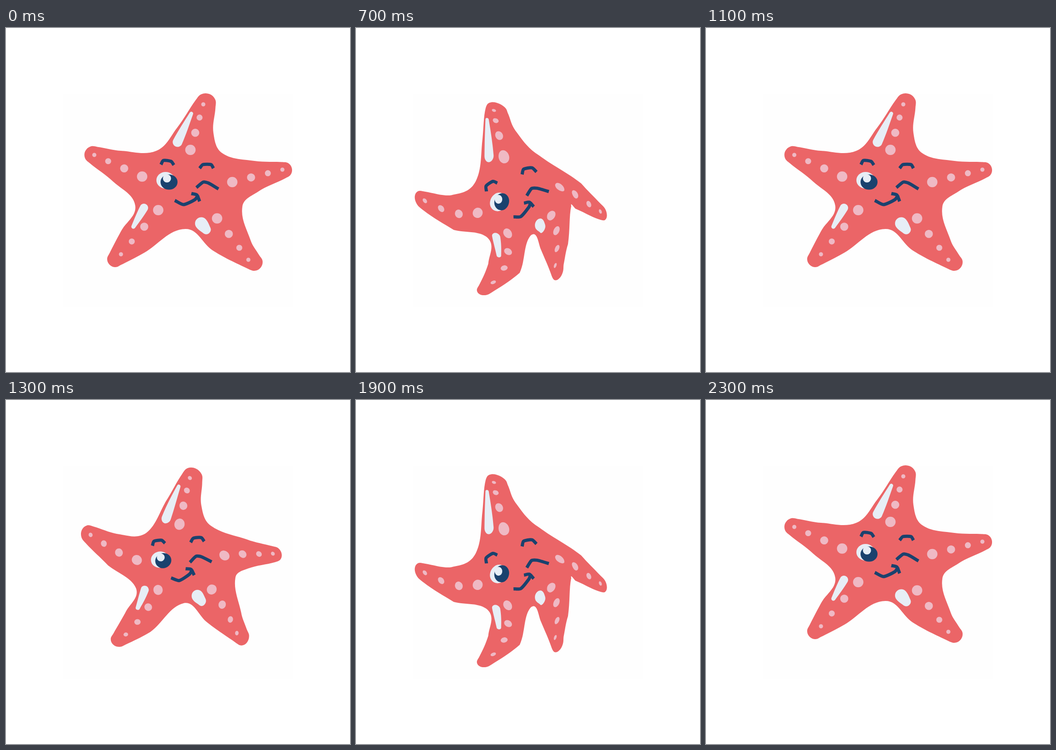
Animation, 748 px wide and 748 px high, one loop 2400 ms. Source, as an HTML page:

```html
<!DOCTYPE html>
<html lang="en">
<head>
<meta charset="utf-8">
<title>Waving starfish</title>
<style>
  html, body { margin: 0; width: 100%; height: 100%; overflow: hidden; background: #fff; }
  svg { display: block; width: 100vw; height: 100vh; }
</style>
</head>
<body>
<svg id="stage" viewBox="0 0 748 748">
  <rect x="125" y="144" width="498" height="462" fill="#fefefe"/>
</svg>
<script>
const CORAL = '#eb6567', PINK = '#efb9c4', NAVY = '#1a426e', PALE = '#e7eef6';
const STEP_MS = 100, LAST = 5, LEAN_STEPS = 3;

// Arms run clockwise from the top. Each pin is [rest point, leaning point]:
// one side, the centre of the rounded tip, the other side, the hollow after the arm.
// turn: degrees the arm swings per step after the lean. dots: innermost and outermost.
const arms = [
  { pins: [[[372, 217], [298, 228]], [[434, 165], [346, 177]], [[451, 228], [373, 236]], [[470, 272], [398, 277]]],
    radius: 23, turn: -18.5, dots: [[401, 265], [429, 166]] },
  { pins: [[[540, 289], [490, 331]], [[604, 309], [541, 389]], [[548, 356], [484, 387]], [[514, 388], [468, 387]]],
    radius: 18, turn: 7, dots: [[492, 335], [601, 308]] },
  { pins: [[[532, 462], [470, 462]], [[539, 509], [457, 522]], [[450, 484], [414, 484]], [[390, 437], [380, 451]]],
    radius: 19, turn: 11, dots: [[459, 414], [527, 504]] },
  { pins: [[[300, 489], [342, 535]], [[238, 502], [265, 555]], [[250, 442], [278, 504]], [[281, 386], [286, 456]]],
    radius: 18, turn: -10, dots: [[331, 396], [250, 492]] },
  { pins: [[[233, 334], [200, 411]], [[190, 276], [166, 327]], [[250, 267], [222, 339]], [[327, 267], [260, 334]]],
    radius: 19.5, turn: -23.6, dots: [[296, 323], [192, 276]] }
];

// Eye, wink, mouth and two spots below them.
const facePins = [
  [[350, 331], [312, 376]], [[437, 338], [391, 350]], [[388, 384], [360, 409]],
  [[331, 396], [330, 447]], [[428, 430], [401, 430]]
];

const faceLines = [
  [[337, 297], [342, 288], [359, 290], [365, 298]],
  [[421, 305], [428, 297], [446, 297], [451, 305]],
  [[414, 347], [429, 335], [440, 337], [462, 350]],
  [[367, 375], [386, 384], [411, 373], [418, 363]],
  [[403, 360], [415, 363], [421, 377]]
];

const mix = (a, b, k) => [a[0] + (b[0] - a[0]) * k, a[1] + (b[1] - a[1]) * k];
const angleTo = (a, b) => Math.atan2(b[1] - a[1], b[0] - a[0]);

function rotate([x, y], [cx, cy], angle) {
  const c = Math.cos(angle), s = Math.sin(angle), dx = x - cx, dy = y - cy;
  return [cx + dx * c - dy * s, cy + dx * s + dy * c];
}

// Half circle around a rounded end that points along `angle`.
const cap = ([x, y], r, angle) => [-2, -1, 0, 1, 2].map(i => {
  const a = angle + i * Math.PI / 4;
  return [x + r * Math.cos(a), y + r * Math.sin(a)];
});

const drop = (p, r, q, s) => [...cap(p, r, angleTo(q, p)), ...cap(q, s, angleTo(p, q))];

const ellipse = (x, y, rx, ry = rx) => Array.from({ length: 8 }, (_, i) => {
  const a = i * Math.PI / 4;
  return [x + rx * Math.cos(a), y + ry * Math.sin(a)];
});

const outline = arms.flatMap(({ pins, radius }) => {
  const [a, tip, b, hollow] = pins.map(p => p[0]);
  return [a, ...cap(tip, radius, angleTo(mix(a, b, 0.5), tip)), b, hollow];
});

const dots = arms.flatMap(({ dots: [inner, outer] }) =>
  [0, 0.375, 0.71, 1].map(k => ellipse(...mix(inner, outer, k), 11.3 - 6.8 * k)));

// The body first leans over, then each arm swings about its own root.
function pinsAt(step) {
  const lean = Math.min(step / LEAN_STEPS, 1);
  const swing = Math.max(0, step - LEAN_STEPS) ** 0.85;
  const place = ([rest, leaning]) => mix(rest, leaning, lean);
  const hollows = arms.map(arm => place(arm.pins[3]));
  const limbs = arms.flatMap(({ pins, turn }, i) => {
    const root = mix(hollows[(i + 4) % 5], hollows[i], 0.5);
    return pins.slice(0, 3).map(p => rotate(place(p), root, turn * swing * Math.PI / 180));
  });
  return [...limbs, ...hollows, ...facePins.map(place)];
}

// Gauss-Jordan elimination on rows that end in two right-hand values.
function solve(rows) {
  const n = rows.length;
  for (let c = 0; c < n; c++) {
    let best = c;
    for (let r = c + 1; r < n; r++) if (Math.abs(rows[r][c]) > Math.abs(rows[best][c])) best = r;
    [rows[c], rows[best]] = [rows[best], rows[c]];
    for (let r = 0; r < n; r++) {
      if (r === c) continue;
      const k = rows[r][c] / rows[c][c];
      for (let j = c; j < n + 2; j++) rows[r][j] -= k * rows[c][j];
    }
  }
  return rows.map((row, i) => [row[n] / row[i], row[n + 1] / row[i]]);
}

// Thin-plate warp that carries the points `from` exactly onto `to`.
function makeWarp(from, to) {
  const bend = (p, q) => {
    const d = ((p[0] - q[0]) ** 2 + (p[1] - q[1]) ** 2) / 1e4;
    return d ? d * Math.log(d) : 0;
  };
  const basis = p => [...from.map(q => bend(p, q)), 1, p[0] / 100, p[1] / 100];
  const flat = [() => 1, p => p[0] / 100, p => p[1] / 100];
  const weights = solve([
    ...from.map((p, i) => [...basis(p), ...to[i]]),
    ...flat.map(f => [...from.map(f), 0, 0, 0, 0, 0])
  ]);
  return p => basis(p).reduce((sum, v, i) => [sum[0] + v * weights[i][0], sum[1] + v * weights[i][1]], [0, 0]);
}

// Smooth curve through the points, with every control point warped.
function curve(pts, warp, closed, pull) {
  const n = pts.length;
  const at = i => closed ? pts[(i + n) % n] : pts[Math.max(0, Math.min(n - 1, i))];
  const text = p => warp(p).map(v => v.toFixed(2)).join(' ') + ' ';
  const handle = (i, len) => {
    const a = angleTo(at(i - 1), at(i + 1));
    return [at(i)[0] + pull * len * Math.cos(a), at(i)[1] + pull * len * Math.sin(a)];
  };
  let d = 'M' + text(pts[0]);
  for (let i = 0; i < (closed ? n : n - 1); i++) {
    const p = at(i), q = at(i + 1), len = Math.hypot(q[0] - p[0], q[1] - p[1]);
    d += 'C' + text(handle(i, len)) + text(handle(i + 1, -len)) + text(q);
  }
  return d + (closed ? 'Z' : '');
}

const stage = document.getElementById('stage');

function add(parent, tag, attrs) {
  const el = document.createElementNS('http://www.w3.org/2000/svg', tag);
  for (const name in attrs) el.setAttribute(name, attrs[name]);
  return parent.appendChild(el);
}

function buildPose(step) {
  const g = add(stage, 'g', { visibility: 'hidden' });
  const warp = makeWarp(pinsAt(0), pinsAt(step));
  const fill = (pts, color) => add(g, 'path', { d: curve(pts, warp, true, 0.36), fill: color });

  fill(outline, CORAL);
  dots.forEach(dot => fill(dot, PINK));
  fill(drop([403, 186], 4, [373, 248], 10.5), PALE);
  fill(drop([300, 391], 9, [277, 432], 4.5), PALE);
  fill(drop([424.5, 425], 13.5, [435, 438], 10.5), PALE);
  fill(ellipse(347, 331, 20, 18), PALE);
  fill(ellipse(354.5, 335, 18.5, 16.5), NAVY);
  fill(ellipse(350, 327, 8.8), PALE);
  faceLines.forEach(pts => add(g, 'path', {
    d: curve(pts, warp, false, 0.2), fill: 'none', stroke: NAVY, 'stroke-width': 7, 'stroke-linejoin': 'round'
  }));
  return g;
}

const poses = Array.from({ length: LAST + 1 }, (_, step) => buildPose(step));
const start = performance.now();
let shown = null;

function draw() {
  const tick = Math.floor(Math.max(0, performance.now() - start) / STEP_MS) % (2 * LAST + 2);
  const pose = poses[tick <= LAST ? tick : 2 * LAST + 1 - tick];
  if (pose !== shown) {
    if (shown) shown.setAttribute('visibility', 'hidden');
    pose.setAttribute('visibility', 'visible');
    shown = pose;
  }
  requestAnimationFrame(draw);
}
draw();
</script>
</body>
</html>
```
